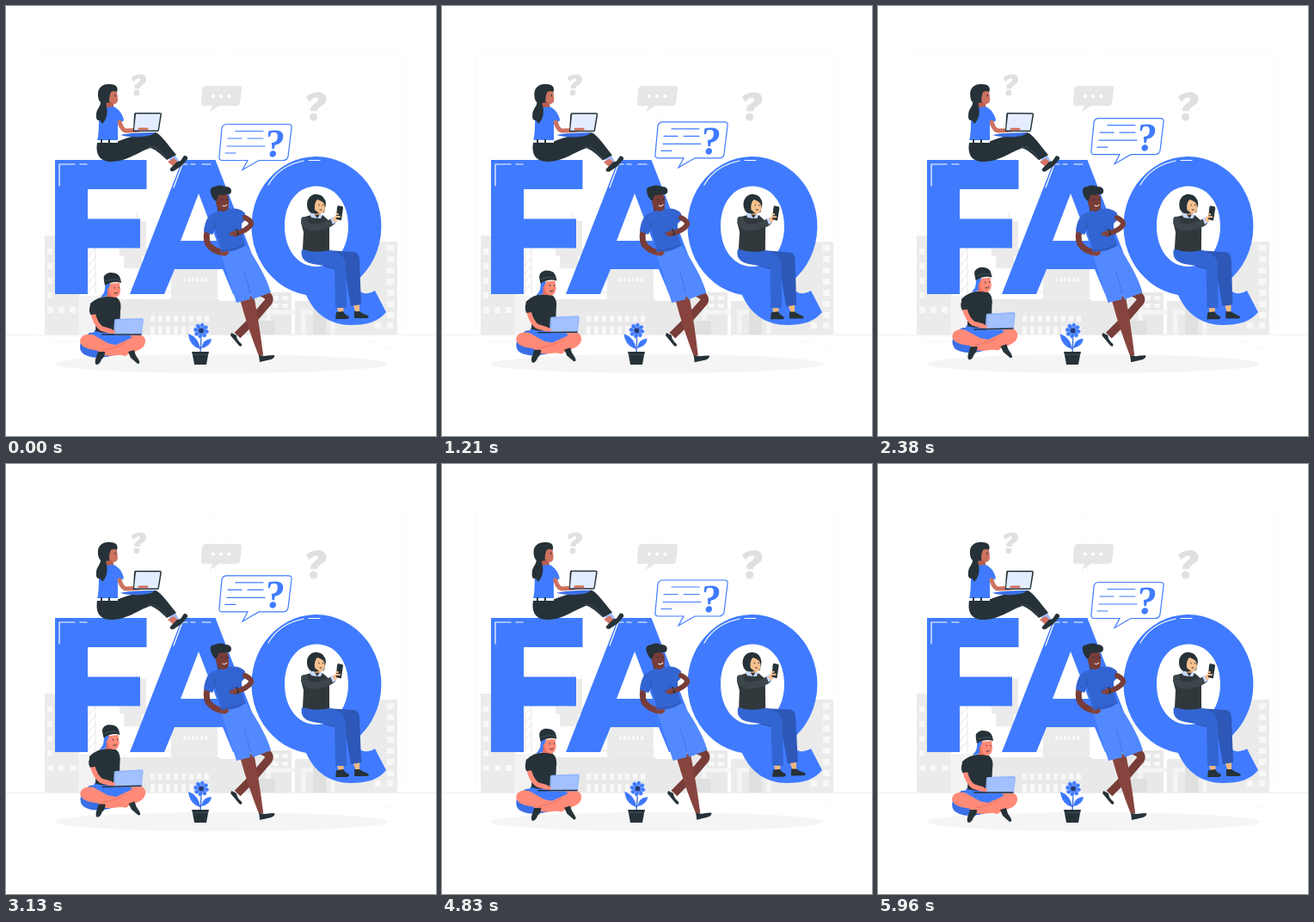
An HTML page for the animation above (6000 ms loop, 500 px wide and 500 px high).

```html
<!DOCTYPE html>
<html lang="en">
<head>
<meta charset="utf-8">
<title>FAQ</title>
<style>
html, body { margin: 0; width: 100%; height: 100%; overflow: hidden; background: #fff; }
svg { display: block; width: 100vw; height: 100vh; }
.blue { fill: #407bff; }
.dark { fill: #263238; }
.line { fill: none; stroke-linecap: round; stroke-linejoin: round; }
.mark { font: bold 46px "Liberation Serif", "Noto Serif", serif; }
</style>
</head>
<body>
<svg viewBox="0 0 500 500">
  <defs>
    <g id="ask">
      <path d="M1 5C5 0 18 -2 18.500 6C19 13 11 12 11 17H5C4 11 11 10 11.500 7C12 4 7 5 4 9Z" fill="#e0e0e0"/>
      <circle cx="7.500" cy="22" r="3.400" fill="#e0e0e0"/>
    </g>
  </defs>

  <!-- backdrop -->
  <g fill="none" stroke="#fafafa">
    <rect x="39.500" y="55.500" width="204" height="327" rx="2"/>
    <rect x="256.500" y="55.500" width="204" height="327" rx="2"/>
  </g>
  <g fill="#ebebeb">
    <path d="M45 267H85V383H45ZM410 274H455V383H410ZM336 343H412V383H336Z"/>
    <path d="M97 341H248V383H97ZM248 343H284V383H248ZM281 333H332V383H281Z" fill="#e9e9e9"/>
    <path d="M84 337H110V383H84Z" fill="#f3f3f3"/>
    <path d="M132 282H200V290H132ZM137 290H158V305H137ZM152 250H163V282H147Q147 262 152 250Z"/>
    <path d="M192 305H246V341H192Z"/>
    <path d="M305 333V383M305 356H336M346 383V356H380V383" fill="none" stroke="#f5f5f5" stroke-width="5"/>
    <path d="M285 366H313V383H285ZM357 345H372V383H357Z" fill="#e0e0e0"/>
  </g>
  <g class="line" stroke="#e6e6e6">
    <path d="M96 282V334M104 282V334M96 292L104 282M96 302L104 292M96 312L104 302M96 322L104 312M96 332L104 322M152 242V256M163 333H247M163 345H247M204 318H240M204 322H240M134 290H162"/>
  </g>
  <g id="windows" fill="#f8f8f8"></g>
  <path d="M0 382.500H500" stroke="#f0f0f0"/>
  <path d="M416 390H431M441 398H449M52 390H85" stroke="#f5f5f5"/>
  <ellipse cx="250" cy="416" rx="194" ry="11" fill="#f5f5f5"/>
  <use href="#ask" transform="translate(144.500 79)"/>
  <use href="#ask" transform="translate(347.500 99.500) scale(1.34)"/>
  <path d="M232 93H271Q275 93 274 97L272 112Q272 116 268 116H248L237 123L240 116H230Q226 116 227 112L228 97Q229 93 232 93Z" fill="#e6e6e6"/>
  <g fill="#fff"><circle cx="241" cy="105" r="2"/><circle cx="250" cy="105" r="2"/><circle cx="259.500" cy="105" r="2"/></g>

  <!-- letters -->
  <g class="blue" fill-rule="evenodd">
    <path d="M57 179H163.500V213H95V247.500H156V281.500H95V335H57Z"/>
    <path d="M144 335L205 179H243.500L304 335H264L252 306H196L184 335ZM203 273H245L224 218Z"/>
    <path d="M349 336A75.500 81 0 1 1 406 321C409 333 416 338 429 331L442 356C433 367 420 371 401 371C378 371 359 359 349 336ZM361 209.500C339 209.500 324 229 324 256C324 283 339 303 361 303C383 303 398 283 398 256C398 229 383 209.500 361 209.500Z"/>
  </g>
  <path class="line" stroke="#fff" stroke-width="1.200" d="M62 209V184H80M86 184H94M195 211L205 184H211M215 184H220M228 184H238M305 208C313 194 326 184 346 180M352 179.500H365"/>

  <!-- speech bubble -->
  <g id="bubble">
    <path d="M257 137.500H328Q333 137.500 332 142L328 175Q327 179.500 322 179.500H294L275 190.500L281 179.500H252Q247 179.500 248 175L251 142Q252 137.500 257 137.500Z" fill="#fff" stroke="#407bff" stroke-width="1.200"/>
    <path class="line" stroke="#407bff" stroke-width="1.200" d="M267 145.500H299M258 154H274M281 154H299M257 163H301M255 171H267"/>
    <text class="mark blue" text-anchor="middle" transform="translate(311.500 174.500) skewX(-5)">?</text>
  </g>

  <!-- woman with laptop -->
  <g id="sitter">
    <path d="M189 177L196 172L201 180L194 185Z" fill="#9fbdff"/>
    <path d="M188 181L195 177L201 182L195 187Z" fill="#d47463"/>
    <path class="dark" d="M191 189L199 181L203 180L207 174Q212 174 211 178L204 186L195 192Q190 193 191 189Z"/>
    <path class="dark" d="M106 159L131 157C143 152 160 148 174 147C180 149 188 161 198 173L187 179C180 172 174 167 168 165C153 170 141 181 122 181C108 181 104 171 106 159Z"/>
    <path class="line" d="M165 164L173 164Q181 169 187 177" stroke="#455a64" stroke-width=".7"/>
    <path d="M116 108L125 110L125 121L115 121Z" fill="#b85d4f"/>
    <path class="blue" d="M116 118L125 117C132 120 136 127 137 133L130 138L130 157H106C109 145 107 132 109 125Q111 119 116 118Z"/>
    <path class="dark" d="M107 104C106 94 114 90 122 91C128 91 131 95 129 100L124 104L121 112L116 113C119 122 118 131 112 137L109 133Q104 134 105 126C105 120 110 117 110 112Q107 109 107 104Z"/>
    <path d="M122 100Q126 98 129 100L130 108Q130 114 125 114L120 111Q120 104 122 100Z" fill="#ce7260"/>
    <path d="M106 156H130V159H106Z" fill="#fff"/>
    <path class="dark" d="M110 155H112V160H110ZM119 155H121V160H119Z"/>
    <path class="line" d="M132 135Q135 145 140 145Q151 145 161 143" stroke="#ce7260" stroke-width="5"/>
    <path class="dark" d="M150 124H179Q181 124 181 126L178 144Q178 146 176 146H149Q147 146 148 144L149 126Z"/>
    <path d="M151 125.500H179.500L176.500 144.500H149Z" fill="#e4edff"/>
    <path d="M133 150Q145 147 173 147Q171 151 158 152Q143 153 133 150Z" fill="#3a6fe6"/>
    <path class="line" d="M155 143L164 143" stroke="#ce7260" stroke-width="3"/>
    <path class="line" d="M127 103V105" stroke="#263238"/>
  </g>

  <!-- leaning man -->
  <g id="leaner">
    <path class="line" d="M296 333Q309 337 305 344L287 365L269 383" stroke="#783d39" stroke-width="9.500" style="stroke-linecap:butt"/>
    <path class="dark" d="M262 380L268 383Q268 388 274 393Q275 397 271 395L261 383Z"/>
    <path d="M272 341L288 336Q295 372 299 406L294 407Q281 374 272 341Z" fill="#87443e"/>
    <path class="dark" d="M294 406L301 407Q306 406 312 406Q313 409 308 411L295 414Z"/>
    <path d="M249 286L279 278C290 294 303 315 308 333L287 341L284 335L284 341L268 345C261 325 256 306 249 286Z" fill="#5389ff"/>
    <path d="M277 309Q282 322 284 336" class="line" stroke="#3a6fe6" stroke-width=".8"/>
    <path class="line" d="M236 254Q231 269 235 277Q242 286 254 287" stroke="#783d39" stroke-width="7"/>
    <path d="M245 230L257 230L260 240L247 243Z" fill="#632f2c"/>
    <path d="M236 244Q246 237 260 236Q271 234 278 241L278 249L274 253Q273 267 279 278Q267 287 250 286C248 274 244 266 243 259L240 266L230 262Q231 251 236 244Z" fill="#3365d2"/>
    <path class="line" d="M243 258L242 250M258 265Q264 262 265 257M251 284Q267 284 276 278" stroke="#264a99" stroke-width=".7"/>
    <path class="line" d="M278 246Q286 250 285 254Q281 261 266 265" stroke="#783d39" stroke-width="6"/>
    <path class="line" d="M268 260L270 266" stroke="#263238" stroke-width="2"/>
    <path class="line" d="M262 265L267 263M250 288L257 287" stroke="#87443e" stroke-width="4"/>
    <path d="M244 219Q257 216 259 223V230Q259 239 252 239Q246 238 244 229Z" fill="#783d39"/>
    <path class="dark" d="M238 217Q236 211 243 210Q249 207 255 210Q262 210 262 215Q262 219 258 219L247 220Q246 225 244 227Q239 223 238 217Z"/>
    <path class="line" d="M250 225H252M256 225H258" stroke="#263238"/>
    <path class="line" d="M252 232Q254 234 257 231" stroke="#fff"/>
  </g>

  <!-- woman with phone -->
  <g id="caller">
    <path d="M384 347H393L392 358H387ZM403 346H411L411 357H407Z" fill="#f3b982"/>
    <path class="dark" d="M384 356L392 355Q394 359 399 361Q399 364 396 364H383ZM405 355L411 355Q415 358 421 360Q423 363 419 363H405Z"/>
    <path d="M372 284Q390 285 405 286Q411 287 411 296L413 347L401 349L394 309L370 303Z" fill="#2d58b8"/>
    <path d="M344 283L377 284Q393 288 395 299L396 351H383L382 304L357 300Q341 297 344 283Z" fill="#3365d2"/>
    <path d="M355 235H366V247H354Z" fill="#dfa36e"/>
    <path class="dark" d="M350 231C350 222 357 218 362 219Q371 220 372 230L370 240L357 242Q350 239 350 231Z"/>
    <path d="M362 225Q368 227 370 230L371 235Q370 242 364 241L359 237Q358 229 362 225Z" fill="#f7c08d"/>
    <path d="M346 246Q354 242 368 243L376 250L376 284Q360 288 345 283L346 263L343 252Z" fill="#30383c"/>
    <path d="M353 241L358 241L362 247L355 246ZM365 242L368 243L366 247L362 247Z" fill="#c6d7ff"/>
    <path class="line" d="M347 249Q347 254 353 257Q361 259 376 253L379 251" stroke="#3c464b" stroke-width="8"/>
    <path d="M377 247L381 245L384 251L380 254Z" fill="#c6d7ff"/>
    <path class="line" d="M383 248L386 245" stroke="#f7c08d" stroke-width="5.500"/>
    <path class="dark" d="M386 232L391 233Q392 233 392 235L390 248Q390 250 388 249L385 248Q383 248 384 246L385 234Z"/>
    <path class="line" d="M384 245H388M384 242H386" stroke="#f7c08d" stroke-width="2"/>
    <path class="line" d="M364 231V232M368.500 231V232M365 237H367" stroke="#263238" stroke-width=".9"/>
  </g>

  <!-- plant -->
  <g id="plant">
    <path class="line" d="M226 403Q227 392 227 378" stroke="#3365d2" stroke-width="1.300"/>
    <path class="blue" d="M226 399Q213 395 212 381Q224 385 226 399ZM227 398Q229 387 239 387Q238 396 227 398Z"/>
    <path class="line" d="M226 399Q221 391 215 385M227 398L235 390" stroke="#3365d2" stroke-width=".7"/>
    <g id="petals" class="blue" stroke="#fff" stroke-width=".35"></g>
    <circle cx="227" cy="377.500" r="3" fill="#203a78"/>
  </g>
  <path class="dark" d="M216 402H236L235 406L233 417H219L217 406Z"/>
  <path d="M217 405.500H235" stroke="#455a64" stroke-width=".7"/>

  <!-- boy with laptop -->
  <g id="boy">
    <path d="M88 388Q82 403 95 407Q108 412 132 404L145 388L130 377L97 380Z" fill="#3a6fe6"/>
    <path d="M105 381Q131 384 140 382Q160 379 162 388Q163 397 152 401L141 405L112 393Z" fill="#ff8a77"/>
    <path class="blue" d="M103 377L128 379Q146 380 146 386L128 394Q111 391 100 386Z"/>
    <path d="M101 382Q88 380 86 389Q86 396 97 399L139 407L146 402L122 394Z" fill="#ff8a77"/>
    <path d="M107 402L111 406Q132 409 152 400L141 392Q126 400 107 399Z" fill="#ff8a77"/>
    <path class="line" d="M112 400Q129 398 139 391" stroke="#e66f62" stroke-width=".8"/>
    <path class="dark" d="M107 402L115 402Q115 408 111 411Q109 417 105 417Q103 416 104 411ZM142 402L149 400Q150 406 154 411Q157 416 153 416L145 409Z"/>
    <path d="M118 327H128V343H116Z" fill="#e66f62"/>
    <path d="M98 346Q108 337 118 338L129 339Q135 344 133 355L132 378Q116 382 104 378L105 361L97 356Z" class="dark"/>
    <path class="line" d="M101 357Q104 370 111 375L121 378" stroke="#ff8a77" stroke-width="5.500"/>
    <path d="M97 352Q99 344 106 341L108 358L98 359Z" class="dark"/>
    <path d="M119 323L132 322L133 331Q132 339 126 339Q119 337 119 323Z" fill="#ff8a77"/>
    <path class="blue" d="M116 321L121 322Q121 327 118 329L118 336Q115 339 110 338Q115 334 115 328Z"/>
    <path class="dark" d="M114 320Q112 312 120 310Q131 309 133 317L134 322Q125 319 115 325Z"/>
    <path class="line" d="M116 320Q125 316 133 319" stroke="#455a64" stroke-width=".8"/>
    <path class="line" d="M126 327V328M131 327V328M126 334Q129 335 130 333" stroke="#263238" stroke-width=".9"/>
    <path d="M128 364L158 363Q160 363 160 365L158 381Q158 383 156 383H127Q125 383 125 381L126 366Q126 364 128 364Z" fill="#91b5ff"/>
    <path d="M128 365.500L159 364.500L157 381H127Z" fill="#a3c0ff"/>
    <path class="line" d="M112 382H157" stroke="#263238" stroke-width="1.500"/>
    <path class="line" d="M119 378L125 379" stroke="#ff8a77" stroke-width="4"/>
  </g>
</svg>
<script>
const $ = id => document.getElementById(id);
const add = (parent, tag, attrs) => {
  const el = document.createElementNS("http://www.w3.org/2000/svg", tag);
  for (const key in attrs) el.setAttribute(key, attrs[key]);
  parent.append(el);
};

const grid = (x, y, cols, rows, dx, dy, width, height) => {
  for (let i = 0; i < cols * rows; i++)
    add($("windows"), "rect", { x: x + i % cols * dx, y: y + Math.floor(i / cols) * dy, width, height });
};
grid(48, 282, 1, 4, 0, 17, 6, 7);
grid(48, 350, 3, 1, 13, 0, 7, 7);
grid(443, 278, 1, 7, 0, 13, 8, 7);
grid(429, 368, 2, 1, 14, 0, 7, 7);
grid(168, 360, 8, 1, 9, 0, 5, 7);
grid(168, 372, 8, 1, 9, 0, 5, 10);
grid(206, 316, 6, 1, 5, 0, 3, 5);
grid(310, 337, 2, 2, 11, 9, 7, 5);

for (let a = 0; a < 360; a += 45)
  add($("petals"), "ellipse", { cx: 227, cy: 371.8, rx: 2.6, ry: 3.4, transform: `rotate(${a + 10} 227 377.500)` });

const LOOP = 6000;
const pose = (id, value) => $(id).setAttribute("transform", value);

function draw(now) {
  const phase = now % LOOP / LOOP * 2 * Math.PI;
  const lift = (1 - Math.cos(phase)) / 2;
  const sway = Math.sin(phase);
  pose("bubble", `translate(0 ${-7.6 * lift})`);
  pose("boy", `translate(0 ${-6.8 * lift}) rotate(${-1.5 * lift} 122 380)`);
  pose("sitter", `rotate(${0.4 * sway} 125 165)`);
  pose("leaner", `rotate(${0.5 * sway} 260 255)`);
  pose("caller", `rotate(${0.7 * sway} 365 270)`);
  pose("plant", `rotate(${-1.2 * sway} 226 403)`);
  requestAnimationFrame(() => draw(performance.now()));
}
draw(performance.now());
</script>
</body>
</html>
```
